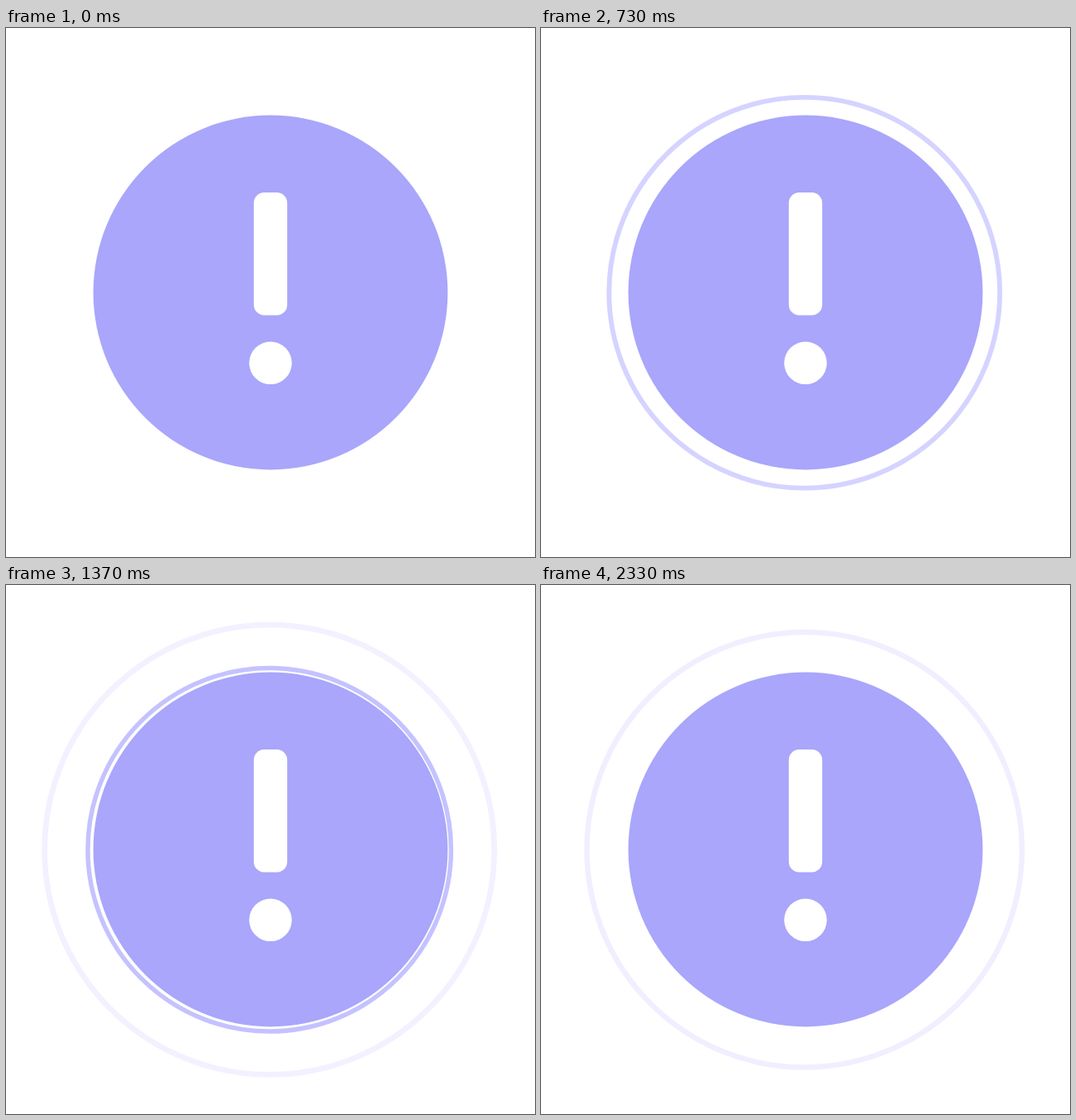
Write an HTML page that moves like this. It is 640x640 px and loops after 2560 ms.

```html
<!DOCTYPE html>
<html lang="en">
<head>
<meta charset="utf-8">
<title>Alert pulse</title>
<style>
  html, body { margin: 0; width: 100%; height: 100%; overflow: hidden; background: #fff; }
  svg { display: block; width: 100%; height: 100%; }
</style>
</head>
<body>
<svg viewBox="0 0 640 640">
  <g fill="none" stroke="#b4b1ff">
    <circle class="ring" cx="318.7" cy="320.3" r="0"/>
    <circle class="ring" cx="318.7" cy="320.3" r="0"/>
  </g>
  <circle cx="320" cy="320" r="214.4" fill="#a9a6fb"/>
  <rect x="299.8" y="199" width="40.4" height="148.5" rx="12.5" fill="#fff"/>
  <circle cx="320" cy="405.3" r="25.8" fill="#fff"/>
</svg>
<script>
const LOOP = 2560, FADE = 1667, LAST = 70;
const els = document.querySelectorAll('.ring');

// Outer radius at a few moments [ms, px]; a cubic passes through them.
const rings = [
  { start: 0, keys: [[333, 221.5], [733, 239.3], [1133, 261.3], [1367, 275.5]] },
  { start: 1000, keys: [[1133, 215], [1367, 222.5], [1733, 237.4], [2333, 266.5]] }
];

function cubic(keys, t) {
  return keys.reduce((sum, [ti, r], i) =>
    sum + keys.reduce((p, [tj], j) => i === j ? p : p * (t - tj) / (ti - tj), r), 0);
}

function draw(ms) {
  // 30 steps a second, resting on the last one until the loop restarts
  const step = Math.min(LAST, Math.floor(ms * 0.03 + 0.15));
  const t = step * 1000 / 30;
  rings.forEach(({ start, keys }, i) => {
    const el = els[i];
    const alpha = 1 - (t - start) / FADE;
    const on = t >= start && alpha > 0.001;
    el.style.display = on ? '' : 'none';
    if (!on) return;
    const outer = cubic(keys, t);
    const width = outer * 0.0245;
    el.setAttribute('r', (outer - width / 2).toFixed(2));
    el.setAttribute('stroke-width', width.toFixed(2));
    el.setAttribute('stroke-opacity', alpha.toFixed(3));
  });
}

const begin = performance.now();
function tick() {
  draw((performance.now() - begin) % LOOP);
  requestAnimationFrame(tick);
}
tick();
</script>
</body>
</html>
```
